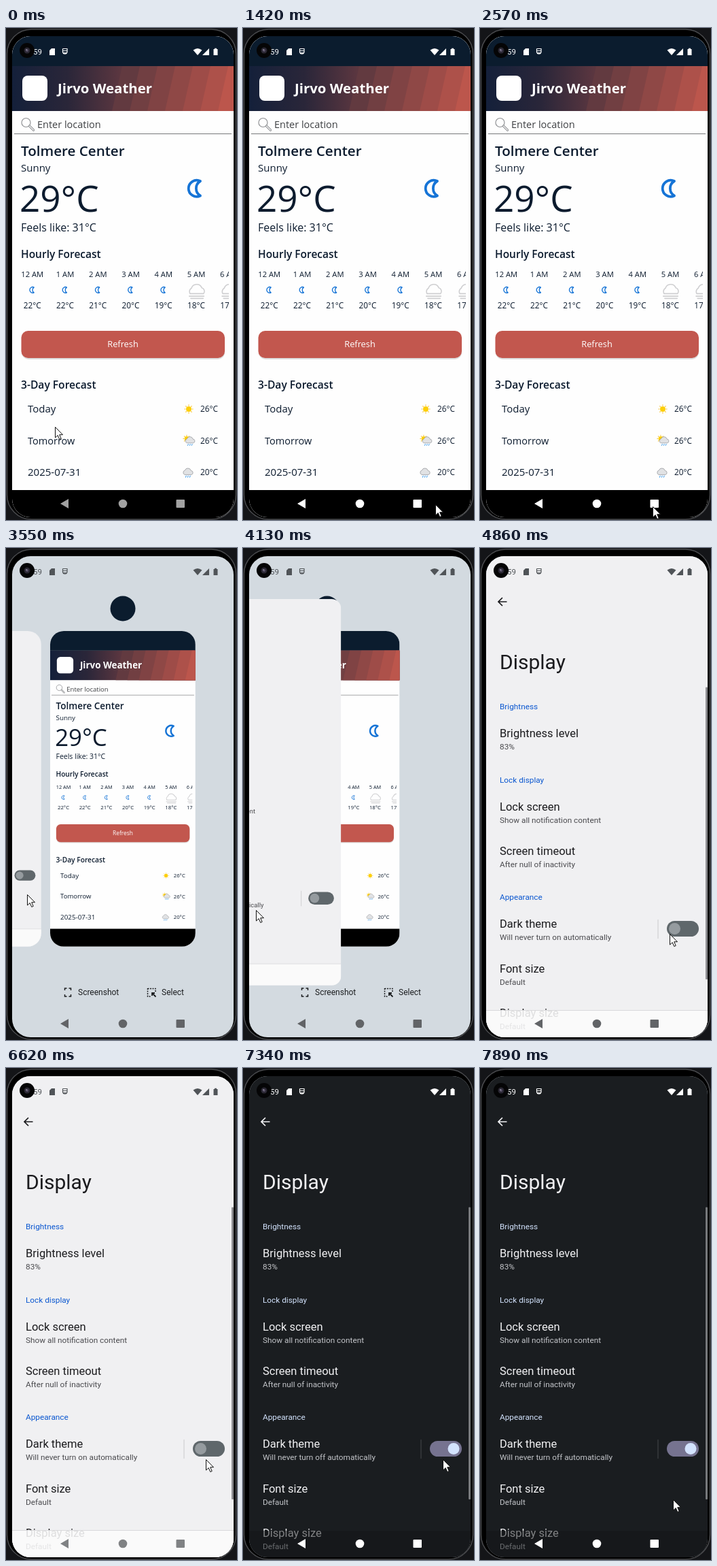
Recreate the animation shown at these times as an HTML page. Size 340x723 px, loop 8 s.

```html
<!DOCTYPE html>
<html lang="en">
<head>
<meta charset="utf-8">
<title>Phone dark theme demo</title>
<style>
html, body { margin: 0; width: 100%; height: 100%; overflow: hidden; background: #000; }
svg { display: block; width: 100vw; height: 100vh; }
svg {
  --bg: #f0f0f2; --ink: #1b1b1e; --sub: #4a4a4e; --link: #0b57d0; --rule: #c9c9cc;
  --bar: #8c8c8f; --strip: rgba(252,252,252,.87); --edge: #d9d9db; --track: #5f676b; --knob: #959b9f;
}
svg.dark {
  --bg: #1a1d20; --ink: #f1f1f3; --sub: #c3c5c9; --link: #d3e3fd; --rule: #45484b;
  --bar: #77797c; --strip: rgba(19,21,23,.5); --edge: transparent; --track: #767390; --knob: #d3e3fd;
}
.w { font-family: "Open Sans", "Noto Sans", sans-serif; fill: #0c1b2e; }
.r { font-family: Roboto, sans-serif; }
.ink { fill: var(--ink); } .sub { fill: var(--sub); } .link { fill: var(--link); }
</style>
</head>
<body>
<svg id="stage" viewBox="0 0 340 723"></svg>
<script>
const svg = document.getElementById('stage');
const LOOP = 8000, NAVY = '#0b1c2e';

const text = (x, y, size, str, cls, extra = '') =>
  `<text x="${x}" y="${y}" font-size="${size}" class="${cls}" ${extra}>${str}</text>`;
const rect = (x, y, w, h, fill, extra = '') =>
  `<rect x="${x}" y="${y}" width="${w}" height="${h}" fill="${fill}" ${extra}/>`;
const at = (x, y, body, s = 1) => `<g transform="translate(${x} ${y}) scale(${s})">${body}</g>`;

// Weather icons, each centred on 0,0
const moon = `<path d="M8 -11A12 12 0 1 0 8 10.5A12.5 12.5 0 0 1 8 -11Z" fill="none"
  stroke="#1674d6" stroke-width="3.8" stroke-linejoin="round"/>`;
const cloudPath = 'M-6 4A4 4 0 0 1 -5.5 -3.5A5.5 5.5 0 0 1 5 -3A3.6 3.6 0 0 1 6 4Z';
const fog = `<g fill="none" stroke="#cfcfd1" stroke-width="1.5" stroke-linecap="round">
  <path d="M-9 4A5.5 5.5 0 0 1 -7 -3.5A7.5 7.5 0 0 1 7 -4A5 5 0 0 1 9.5 4Z"/>
  <path d="M-10 7.5H10M-8 10.5H9"/></g>`;
function sun(r) {
  let rays = '';
  for (let i = 0; i < 8; i++) {
    const a = i * Math.PI / 4, c = Math.cos(a), s = Math.sin(a);
    rays += `M${c * r * 1.2} ${s * r * 1.2}L${c * r * 1.6} ${s * r * 1.6}`;
  }
  return `<circle r="${r}" fill="#fdcf08"/><path d="${rays}" stroke="#f6b712" stroke-width="1.1"/>`;
}
const drops = `<path d="M-3 5.5L-4.500 9M0.5 5.5L-1 9M4 5.5L2.500 9" stroke="#3f9be8" stroke-width="1.2"/>`;
const cloud = `<path d="${cloudPath}" fill="#e1e2e4" stroke="#8b8d91" stroke-width=".8"/>`;
const mixed = at(-3, -3, sun(3.4)) + at(2, 0, cloud + drops, .82);

function header() {
  let s = rect(9, 56, 326, 66, 'url(#head)');
  for (let i = 0; i < 7; i++) {
    const x = 156 + i * 26;
    s += `<path d="M${x + 15} 56H335V122H${x}Z" fill="rgb(${98 + i * 15},${58 + i * 4.6},${64 + i * 2})"/>`;
  }
  return s + rect(24, 70, 37, 37, '#fff', 'rx="8"') +
    text(76, 96, 20.4, 'Jirvo Weather', 'w', 'font-weight="700" style="fill:#fff"');
}

function weather() {
  const bold = 'font-weight="600"';
  let s = rect(9, 12, 326, 707, '#fefefe') + rect(9, 12, 326, 44, NAVY) + header() +
    `<g fill="none" stroke="#8f9194"><circle cx="29.500" cy="139" r="6.500" stroke-width="1.2"/>
     <path d="M34.500 144L40.500 150" stroke-width="3.2" stroke-linecap="round"/>
     <path d="M34.500 144L40.500 150" stroke="#f4f4f4" stroke-width="1.3" stroke-linecap="round"/></g>` +
    text(46, 147, 14.5, 'Enter location', 'w', 'style="fill:#3d3f42"') +
    rect(12, 155, 320, 1, '#77797b') +
    text(22, 188, 20.6, 'Tolmere Center', 'w', bold) +
    text(22, 211, 15, 'Sunny', 'w') +
    text(20, 270, 53, '29°C', 'w') +
    text(22, 299, 16, 'Feels like: 31°C', 'w') +
    at(278, 236, moon) +
    text(22, 338, 15.5, 'Hourly Forecast', 'w', bold);

  let hours = '';
  [22, 22, 21, 20, 19, 18, 17].forEach((deg, i) => {
    const x = 38.8 + i * 48.25, mid = 'text-anchor="middle"';
    hours += text(x, 366, 11.2, `${i || 12} AM`, 'w', mid) + text(x, 412, 11.8, `${deg}°C`, 'w', mid) +
      (i < 5 ? at(x - .5, 385, moon, .36) : at(x + .5, 386, fog, 1.08));
  });
  s += `<g clip-path="url(#hours)">${hours}</g>`;

  s += rect(23, 447, 299, 40, '#000', 'rx="10" opacity=".13"') +
    rect(22.5, 445, 299.5, 40, '#c2574e', 'rx="10"') +
    text(172, 469, 12.8, 'Refresh', 'w', 'text-anchor="middle" style="fill:#fff"') +
    text(22, 530, 15.6, '3-Day Forecast', 'w', bold);
  [['Today', 26, sun(4)], ['Tomorrow', 26, mixed], ['2025-07-31', 20, at(-1, 0, cloud + drops, .85)]]
    .forEach(([day, deg, icon], i) => {
      const y = 560 + i * 46.5;
      s += text(32, y + 5, i === 1 ? 14.5 : 15, day, 'w') + at(269, y, icon) +
        text(312, y + 4, 11.8, `${deg}°C`, 'w', 'text-anchor="end"');
    });
  return s + rect(9, 679, 326, 40, '#000');
}

function settings() {
  const head = (y, str) => text(29, y, 11.8, str, 'r link');
  const item = (y, title, note, id = '') =>
    text(29, y, 16.5, title, 'r ink') + text(29, y + 18, 11.8, note, 'r sub', id);
  return rect(9, 12, 326, 707, 'var(--bg)') +
    `<path d="M39.500 79H27.500M33 73L27 79L33 85" fill="none" stroke="var(--ink)" stroke-width="1.7"/>` +
    text(29, 178, 30, 'Display', 'r ink') +
    head(237, 'Brightness') + item(278, 'Brightness level', '83%') +
    head(345, 'Lock display') + item(386, 'Lock screen', 'Show all notification content') +
    item(451, 'Screen timeout', 'After null of inactivity') +
    head(517, 'Appearance') + item(558, 'Dark theme', '', 'id="note"') +
    item(623.500, 'Font size', 'Default') + item(688.500, 'Display size', 'Default') +
    rect(261.5, 546, 1, 28, 'var(--rule)') +
    rect(275, 548, 47, 23, 'var(--track)', 'rx="11.5"') +
    `<circle id="knob" cy="559.500" r="8.500" fill="var(--knob)"/>` +
    rect(332, 204.5, 3, 429.5, 'var(--bar)', 'id="scroll" rx="1"') +
    rect(9, 680, 326, 39, 'var(--strip)') + rect(9, 679, 326, 1, 'var(--edge)');
}

const overviewActions = `<g fill="none" stroke="#1c1e20" stroke-width="1.5">
  <path d="M86.500 650V647H89.500M92.500 647H95.500V650M95.500 656V659H92.500M89.500 659H86.500V656"/>
  <path d="M208.500 647.500H220V653M208.500 647V659H214" stroke-dasharray="2 1.500"/>
  <path d="M215 654L220.500 659.500M215 658V654H219" stroke-width="1.800"/></g>` +
  text(106, 657, 12, 'Screenshot', 'r', 'fill="#1c1e20"') + text(229, 657, 12, 'Select', 'r', 'fill="#1c1e20"');

const statusBar = text(40, 39, 11.5, '59', 'r') +
  `<path d="M67 30H72V40H64V33Z"/>
   <path d="M83.500 30.500V35.500A3.500 4 0 0 0 90 35.500V33.500H83.500M83.500 30.500H90V33.500M84 36.500H90"
     fill="none" stroke="currentColor" stroke-width="1.200"/>
   <path d="M275.500 32.500Q282 27.500 288.500 32.500L282 40Z"/>
   <path d="M299 30V40H289Z"/>
   <path d="M305.500 31H307V29.800H310V31H311.500V40H305.500Z"/>`;

const navIcons = `<path d="M80 699L92 692V706Z"/><circle cx="172" cy="699" r="6.300"/>` +
  rect(250.5, 693, 12.5, 12, 'currentColor', 'rx="1"');

const cardRect = id => `<clipPath id="${id}Clip"><rect id="${id}Rect" x="9" y="12" width="326" height="707"/></clipPath>`;
const card = (id, body) => `<g id="${id}"><g clip-path="url(#${id}Clip)">${body}</g></g>`;

svg.innerHTML = `<defs>
  <linearGradient id="head"><stop offset="0" stop-color="#14203a"/><stop offset=".25" stop-color="#2a2639"/>
    <stop offset=".6" stop-color="#723e43"/><stop offset="1" stop-color="#b5514a"/></linearGradient>
  <clipPath id="hours"><path d="M9 340H328V430H9Z"/></clipPath>
  <clipPath id="screen"><rect x="9" y="12" width="326" height="707" rx="27"/></clipPath>
  ${cardRect('app')}${cardRect('prefs')}</defs>` +
  rect(0, 0, 340, 723, '#141518') +
  rect(1.5, 2, 337, 720, '#000', 'rx="36" stroke="#4a4b4e" stroke-width="1.5"') +
  `<g clip-path="url(#screen)">` + rect(9, 12, 326, 707, '#d3dae0') +
  `<g id="actions">${overviewActions}</g>` +
  `<circle id="badge" cy="89" r="18.500" fill="${NAVY}"/>` +
  card('app', weather()) + card('prefs', settings()) +
  `<g id="status" fill="currentColor">${statusBar}</g><g id="nav" fill="currentColor">${navIcons}</g></g>
  <circle cx="31" cy="33" r="11" fill="#050506"/><circle cx="31" cy="33" r="4.500" fill="#2a2733"/>
  <circle cx="31" cy="33" r="2" fill="#575066"/><circle cx="30" cy="32" r=".800" fill="#b9b3c6"/>
  <path id="cursor" d="M.500 .500V16L4.200 12.600L6.800 18.500L9.200 17.400L6.700 11.700H11.500Z"
    fill="#fff" stroke="#111" stroke-linejoin="round"/>`;

const parts = {};
['app', 'prefs', 'appRect', 'prefsRect', 'actions', 'badge', 'status', 'nav', 'note', 'knob', 'scroll', 'cursor']
  .forEach(id => parts[id] = document.getElementById(id));

// Pointer stops: time, x, y
const track = [
  [0, 72, 586], [300, 72, 586], [1270, 283, 700], [1420, 283, 700], [2420, 254, 703], [2750, 254, 703],
  [3550, 31, 509], [3850, 31, 509], [4130, 19, 532], [4280, 19, 532], [4780, 279, 567], [4960, 279, 567],
  [5160, 294, 564], [5869, 294, 564], [5870, 294, 566], [6170, 294, 566], [6620, 294, 575],
  [7700, 294, 575], [7890, 284, 634], [LOOP, 284, 634]
];
const ramp = (t, a, b) => Math.min(1, Math.max(0, (t - a) / (b - a)));
const smooth = u => u * u * (3 - 2 * u);
const mix = (a, b, u) => a + (b - a) * u;

function pointer(t) {
  const i = track.findIndex(k => k[0] > t), a = track[i - 1], b = track[i];
  const u = ramp(t, a[0], b[0]);
  return [mix(a[1], b[1], u), mix(a[2], b[2], u)];
}

function place(id, x, y, s, radius) {
  parts[id].setAttribute('transform', `translate(${x - 9 * s} ${y - 12 * s}) scale(${s})`);
  parts[id + 'Rect'].setAttribute('rx', radius / s);
}

function draw(t) {
  const shrink = smooth(ramp(t, 2700, 3080));
  const open = smooth(ramp(t, 3860, 4460));
  const dark = t >= 7340, size = mix(1, .656, shrink);
  const slide = 113 * open;
  const appX = mix(9, 65, shrink), cardY = mix(12, 122, shrink);

  place('app', appX - slide, cardY, size, 20 * shrink);
  place('prefs', mix(appX - 346 * size, 9, open) - 117 * open * (1 - open),
    mix(cardY, 12, open), mix(size, 1, open), 20 - 14 * open);
  parts.app.style.display = open === 1 ? 'none' : '';
  parts.prefs.style.display = shrink === 0 ? 'none' : '';
  parts.scroll.style.display = open === 1 ? '' : 'none';
  parts.actions.setAttribute('opacity', shrink);
  parts.badge.setAttribute('cx', 172 - slide);
  parts.badge.setAttribute('opacity', shrink);

  const light = shrink > .5 && !dark;
  svg.setAttribute('class', dark ? 'dark' : '');
  parts.status.style.color = light ? '#505458' : '#fff';
  parts.nav.style.color = light ? (t < 5460 ? '#626467' : '#808284') : t < 1420 ? '#a2a2a2' : '#fff';
  parts.note.textContent = `Will never turn ${dark ? 'off' : 'on'} automatically`;
  parts.knob.setAttribute('cx', dark ? 310 : 286.5);
  parts.cursor.setAttribute('transform', `translate(${pointer(t)})`);
}

const start = performance.now();
function frame() {
  draw((performance.now() - start) % LOOP);
  requestAnimationFrame(frame);
}
frame();
</script>
</body>
</html>
```
